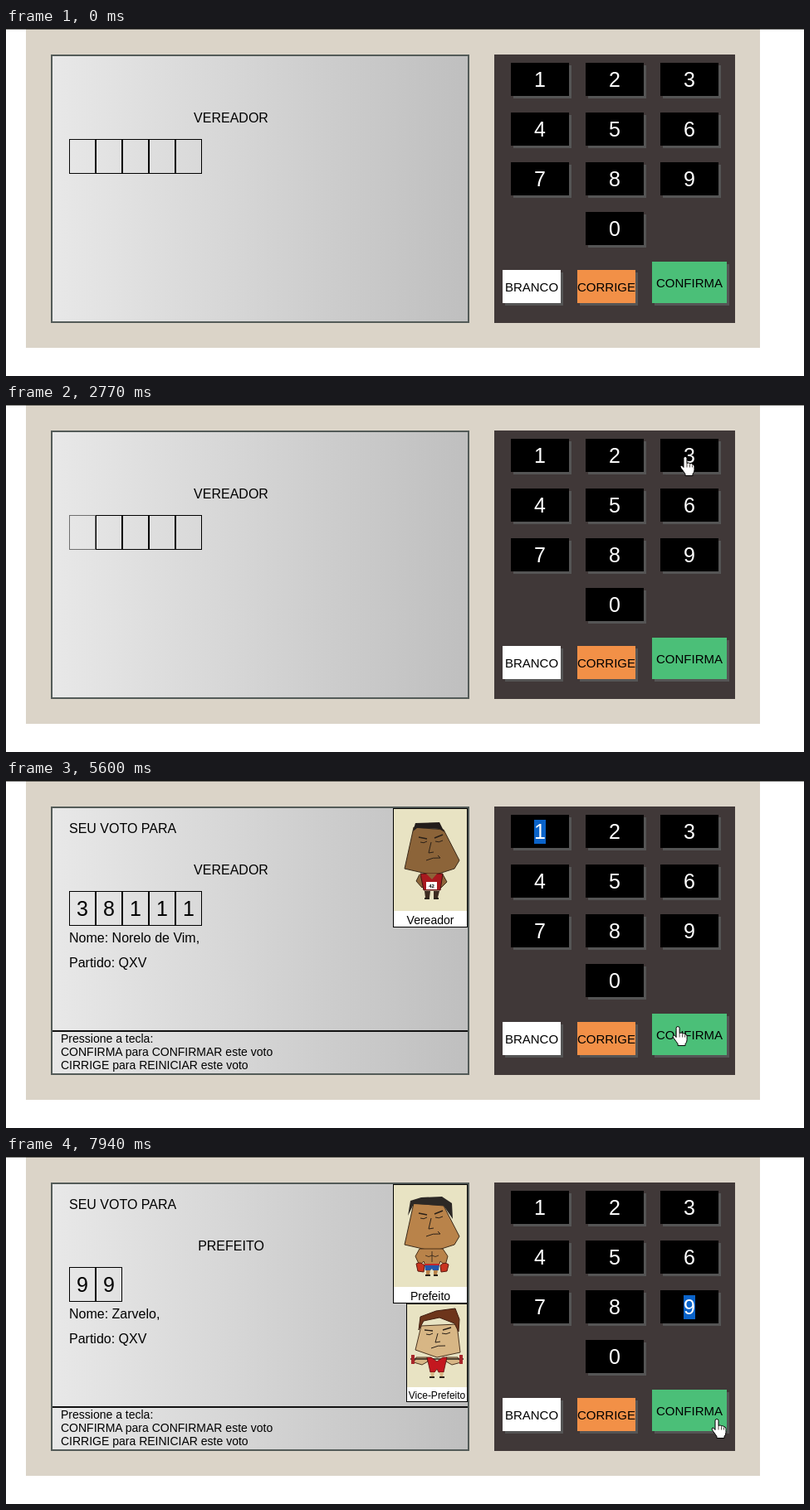
Recreate the animation shown at these times as an HTML page. Size 961 px wide and 420 px high, loop 8000 ms.

```html
<!DOCTYPE html>
<html lang="pt">
<head>
<meta charset="utf-8">
<style>
html, body { margin: 0; width: 100%; height: 100%; overflow: hidden; background: #fff; }
svg { display: block; width: 961px; height: 420px; font-family: "Liberation Sans", Arial, sans-serif; font-size: 16px; }
.mid { text-anchor: middle; }
.big { font-size: 25px; }
.key { font-size: 15px; }
.small { font-size: 14px; }
</style>
</head>
<body>
<svg id="stage" viewBox="0 0 961 420" xmlns="http://www.w3.org/2000/svg"></svg>
<script>
const LOOP = 8000;
const stage = document.getElementById('stage');

const rect = (x, y, w, h, fill, extra = '') =>
  `<rect x="${x}" y="${y}" width="${w}" height="${h}" fill="${fill}" ${extra}/>`;
const text = (x, y, str, cls = '', extra = '') =>
  `<text x="${x}" y="${y}" class="${cls}" ${extra}>${str}</text>`;
const path = (d, fill, stroke = 'none', width = 1) =>
  `<path d="${d}" fill="${fill}" stroke="${stroke}" stroke-width="${width}"/>`;
const line = (d, width = 1) => path(d, 'none', '#2a2018', width);
const group = (id, body, extra = '') => `<g id="${id}" ${extra}>${body}</g>`;

function keyButton(x, y, w, h, fill, label, cls, baseline, ink) {
  return rect(x + 3, y + 3, w, h, '#555') + rect(x, y, w, h, fill) +
    text(x + w / 2, y + baseline, label, 'mid ' + cls, `fill="${ink}"`);
}

function keypad() {
  let out = rect(588, 32, 290, 324, '#403838');
  for (let n = 0; n < 10; n++) {
    const col = n ? (n - 1) % 3 : 1, row = n ? Math.floor((n - 1) / 3) : 3;
    out += keyButton(608 + 90 * col, 42 + 60 * row, 70, 40, '#000', n, 'big', 29, '#fff');
  }
  return out + keyButton(598, 292, 70, 40, '#fff', 'BRANCO', 'key', 26, '#000') +
    keyButton(688, 292, 70, 40, '#f29047', 'CORRIGE', 'key', 26, '#000') +
    keyButton(778, 282, 90, 50, '#4bbf78', 'CONFIRMA', 'key', 31, '#000');
}

const highlight = (id, x, y, digit) => group(id,
  rect(x, y, 14, 29, '#0a63c9') + text(x + 7, y + 23, digit, 'mid big', 'fill="#fff"'));

const frame = (x, y, w, h, imageH, caption, size, drawing) =>
  rect(x + .5, y + .5, w - 1, h - 1, '#fff', 'stroke="#000"') +
  rect(x + 1, y + 1, w - 2, imageH, '#e8e3c3') + drawing +
  text(x + w / 2, y + h - 4, caption, 'mid', `style="font-size:${size}px"`);

const bigFace = skin =>
  path('M491 57L527 60L546 97L540 107L515 115L480 107Z', skin, '#3a2a1a') +
  line('M497 69L507 71M516 70L526 66', 1.5) +
  line('M499 75Q503 77 507 74M517 74Q521 76 526 73') +
  line('M512 75L509 88L515 87M506 97Q514 93 523 94L520 91');

const councilman = bigFace('#8c6439') +
  path('M490 62L493 52L522 51L528 63L522 59L495 58Z', '#231d1b') +
  path('M498 114L494 122L501 130L505 126M526 114L531 123L524 130L520 126', '#8c6439', '#3a2a1a') +
  path('M499 113H526L523 133H503Z', '#a8191f', '#40100f') +
  path('M506 113H519L513 120Z', '#8c6439') +
  rect(506, 123, 13, 9, '#fff') + text(512.5, 130, '42', 'mid', 'style="font-size:6px;font-weight:bold"') +
  path('M504 134H511L510 142H505ZM515 134H522L520 142H515Z', '#3d2b20') +
  line('M504 143H510M515 143H521', 2);

const mayor = bigFace('#b9834a') +
  path('M484 72L487 54L500 50L525 49L537 57L538 76L527 60L491 58Z', '#2c2825') +
  path('M498 112L493 121L498 132L503 127L505 133H521L523 127L529 132L532 121L526 112Z', '#b9834a', '#4a3018') +
  line('M513 115V128M505 120Q509 123 513 120Q517 123 521 120', .8) +
  path('M504 131H522L521 138H514L513 136L511 138H505Z', '#2456a8') +
  rect(504, 130, 18, 2, '#c4282b') +
  path('M494 130Q499 127 504 132L503 140L496 139ZM523 132Q528 127 533 131L531 139L524 140Z', '#c9341f', '#5a1810') +
  path('M506 138H511L510 143H506ZM515 138H520L519 143H515Z', '#b9834a') +
  line('M505 144H511M515 144H520', 2);

const deputy =
  path('M500 205L543 203L547 237L519 243L493 234Z', '#d7b685', '#4a3420') +
  path('M497 210L499 194L518 187L541 184L546 197L545 212L540 202L522 195L503 199Z', '#6d351b', '#3f1d10') +
  line('M504 210L514 211M526 210L536 207', 1.4) + line('M506 215Q510 217 514 214M525 214Q530 216 535 213') +
  line('M520 214L517 225L523 224M512 232Q520 228 529 229') +
  path('M507 243L494 243L491 249L501 252L508 248ZM530 243L544 243L548 249L537 252L530 248Z', '#d7b685', '#4a3420') +
  line('M487 245H551', 1.5) +
  rect(488, 240, 4, 11, '#a8262a') + rect(546, 240, 4, 11, '#a8262a') +
  path('M507 243H512L519 248L526 243H531L527 261H521L519 257L516 261H511Z', '#c4171f', '#5a1210', .8) +
  path('M511 261H516L515 266H512ZM522 261H527L526 266H523Z', '#d7b685') + line('M510 267H516M522 267H528', 2);

const voteInfo = (id, name, photos) => group(id,
  text(76, 64, 'SEU VOTO PARA') + text(76, 196, `Nome: ${name},`) +
  text(76, 226, 'Partido: QXV') + rect(56, 302, 500, 2, '#111') +
  text(66, 317, 'Pressione a tecla:', 'small') +
  text(66, 333, 'CONFIRMA para CONFIRMAR este voto', 'small') +
  text(66, 349, 'CIRRIGE para REINICIAR este voto', 'small') + photos);

const digitBox = i => group('box' + i,
  rect(76.5 + 32 * i, 134.5, 31, 41, 'none', 'stroke="#000"') +
  text(92 + 32 * i, 164, '', 'mid big', `id="digit${i}"`));

const hand = path('M-2 2Q-2 0 0 0Q2 0 2 2V8Q4 6.500 6 8.500Q8 7.500 9 9.500Q11 9 11 12V16Q11 19 9 21V23H0V21Q-2 18 -5 14Q-7 11 -5 10.500Q-3.500 10.500 -2 13Z', '#fff', '#000') +
  line('M2 8V13M5.500 9V13M8.500 10V13', .8);

stage.innerHTML =
  `<defs><linearGradient id="lcd"><stop stop-color="#e8e8e8"/><stop offset="1" stop-color="#bfbfbf"/></linearGradient></defs>` +
  rect(0, 0, 961, 420, '#fff') + rect(24, 0, 884, 386, '#dbd4c8') + rect(0, 0, 961, 1.6, '#111') +
  rect(55, 33, 502, 322, 'url(#lcd)', 'stroke="#535b58" stroke-width="2"') +
  text(271, 114, '', 'mid', 'id="office"') + [0, 1, 2, 3, 4].map(digitBox).join('') +
  voteInfo('info0', 'Norelo de Vim', frame(466, 34, 90, 144, 123, 'Vereador', 14, councilman)) +
  voteInfo('info1', 'Zarvelo', frame(466, 34, 90, 144, 123, 'Prefeito', 14, mayor) +
    frame(482, 178, 74, 119, 100, 'Vice-Prefeito', 12, deputy)) +
  keypad() + highlight('mark1', 636, 48, 1) + highlight('mark9', 816, 168, 9) +
  '<circle id="press" r="12" fill="#ff0" opacity=".5"/>' + group('hand', hand);

const el = id => document.getElementById(id);
const show = (id, on) => el(id).setAttribute('visibility', on ? 'visible' : 'hidden');

const ballots = [
  { office: 'VEREADOR', from: 0, blinkFrom: -380, size: 5,
    typed: [[2960, 3], [3590, 8], [4120, 1], [4410, 1], [4640, 1]] },
  { office: 'PREFEITO', from: 6000, blinkFrom: 6000, size: 2,
    typed: [[6940, 9], [7240, 9]] }
];

const presses = [[2840, 2960], [3520, 3590], [4050, 4120], [4330, 4410],
  [4540, 4640], [5930, 6000], [6800, 6940], [7140, 7240]];

// time, x, y of the pointer hotspot
const route = [
  [260, 948, 408], [620, 790, 215], [1060, 656, 72], [1200, 652, 65], [1400, 662, 95], [1660, 708, 182],
  [1870, 717, 188], [2080, 717, 188], [2480, 790, 98], [2770, 817, 63],
  [2840, 816, 62], [2900, 816, 62], [3380, 739, 184], [3520, 739, 184],
  [3910, 652, 66], [5190, 652, 66], [5400, 740, 195], [5600, 808, 297],
  [5930, 834, 316], [6000, 834, 316], [6470, 822, 199], [6610, 822, 199],
  [6800, 820, 192], [7480, 820, 192], [7740, 868, 280], [7940, 855, 317]
];

function pointer(t) {
  const i = route.findIndex(p => p[0] > t);
  if (i < 0) return route[route.length - 1].slice(1);
  const [t0, x0, y0] = route[i - 1], [t1, x1, y1] = route[i];
  const k = (t - t0) / (t1 - t0);
  return [x0 + (x1 - x0) * k, y0 + (y1 - y0) * k];
}

// cubic-bezier(.25, .1, .25, 1)
function ease(x) {
  let lo = 0, hi = 1, s = .5;
  for (let i = 0; i < 18; i++) {
    s = (lo + hi) / 2;
    const bx = .75 * s * (1 - s) + s ** 3;
    if (bx < x) lo = s; else hi = s;
  }
  return .3 * s * (1 - s) ** 2 + 3 * s * s * (1 - s) + s ** 3;
}

function blink(ms) {
  const phase = ms / 1000 % 1;
  return phase < .5 ? ease(phase * 2) : 1 - ease(phase * 2 - 1);
}

function update(t) {
  const page = t < ballots[1].from ? 0 : 1;
  const { office, blinkFrom, size, typed } = ballots[page];
  const done = typed.filter(([at]) => t >= at);
  const since = done.length ? done[done.length - 1][0] : blinkFrom;
  el('office').textContent = office;
  for (let i = 0; i < 5; i++) {
    show('box' + i, i < size);
    el('digit' + i).textContent = done[i] ? done[i][1] : '';
    el('box' + i).setAttribute('opacity', i === done.length ? blink(t - since) : 1);
  }
  show('info0', page === 0 && done.length === size);
  show('info1', page === 1 && done.length === size);
  show('mark1', t >= 4540 && t < 5930);
  show('mark9', t >= 7140);

  const visible = t >= route[0][0];
  show('hand', visible);
  show('press', presses.some(([a, b]) => t >= a && t < b));
  if (visible) {
    const [x, y] = pointer(t);
    el('hand').setAttribute('transform', `translate(${x + 1} ${y + .5})`);
    el('press').setAttribute('cx', x);
    el('press').setAttribute('cy', y);
  }
}

const start = performance.now();
function tick() {
  update((performance.now() - start) % LOOP);
  requestAnimationFrame(tick);
}
update(0);
requestAnimationFrame(tick);
</script>
</body>
</html>
```
